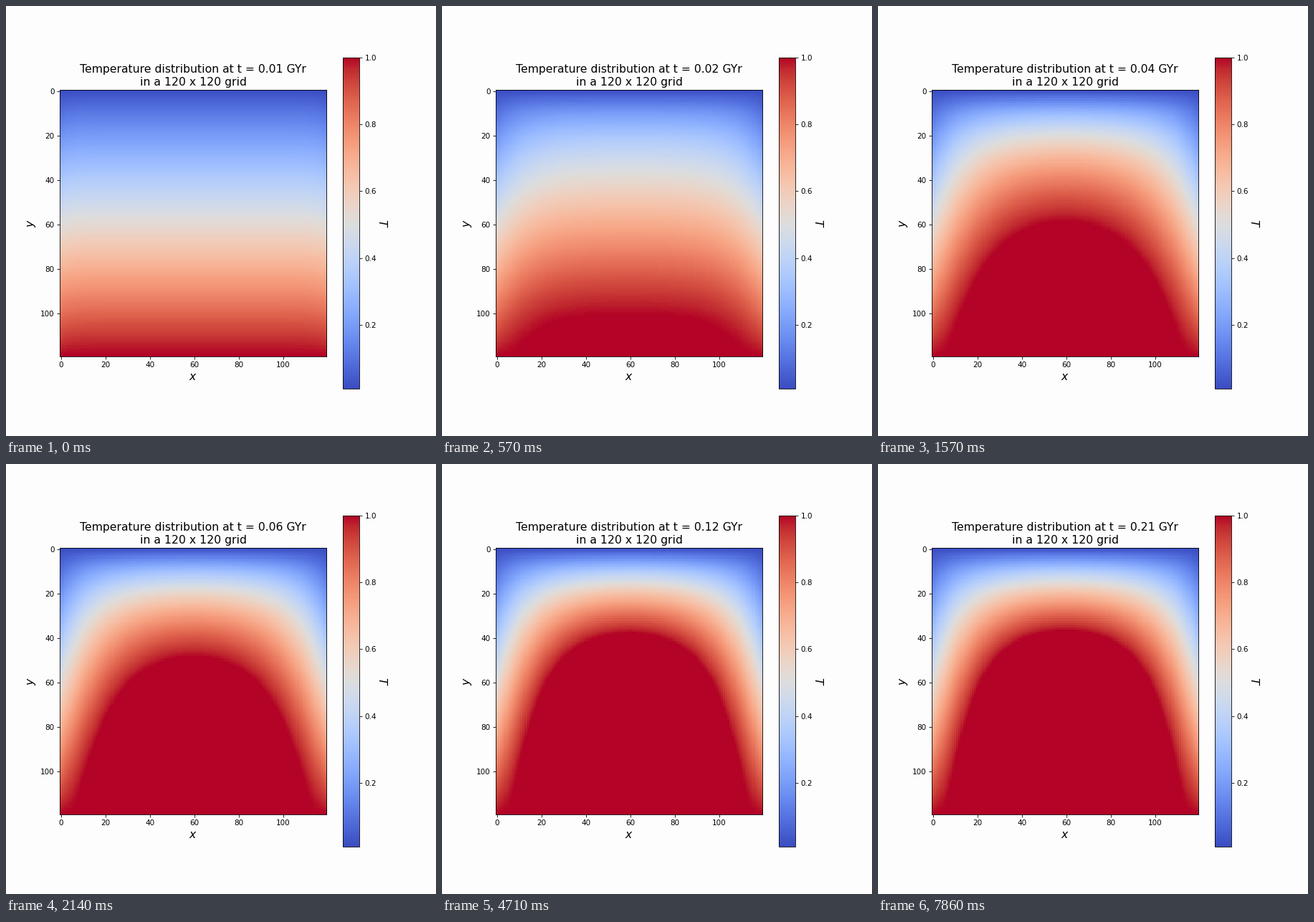
These frames come from a looping animation (600x600 px, 8 s). A matplotlib script:

```python
import numpy as np
import matplotlib.pyplot as plt
from matplotlib.animation import FuncAnimation

N = 120
FRAMES = 56
LOOP_MS = 8000
SOURCE = 10.63          # heat source over diffusivity, unit square

plt.rcParams["font.family"] = "DejaVu Sans"

# Edges are held at a linear profile; the interior heats up from it.
base = np.repeat((np.arange(1, N + 1) / N)[:, None], N, axis=1)
modes = np.arange(1, 60, 2)
sines = np.sin(np.pi * np.outer(np.linspace(0, 1, N), modes))
m, n = np.meshgrid(modes, modes)
rate = np.pi ** 2 * (m ** 2 + n ** 2)
steady = 16 * SOURCE / (np.pi ** 2 * m * n * rate)


def temperature(tau):
    return base + sines @ (steady * (1 - np.exp(-rate * tau))) @ sines.T


def title(i):
    t = max(0.01, 0.00495 + 0.00364 * i)
    return f"Temperature distribution at t = {t:.2f} GYr\nin a {N} x {N} grid"


fig, ax = plt.subplots(figsize=(8, 8), dpi=75, facecolor="#fefdfe")
image = ax.imshow(base, cmap="coolwarm", vmin=1 / N, vmax=1,
                  interpolation="nearest")
heading = ax.set_title(title(0), fontsize=15)
ax.set_xlabel("$x$", fontsize=15)
ax.set_ylabel("$y$", fontsize=15)
bar = fig.colorbar(image)
bar.set_label("$T$", fontsize=15, rotation=270, labelpad=15)


def update(i):
    image.set_data(temperature(0.002 + 0.0055 * i))
    heading.set_text(title(i))
    return image, heading


anim = FuncAnimation(fig, update, frames=FRAMES, interval=LOOP_MS / FRAMES,
                     repeat=True, repeat_delay=0)
plt.show()
```
